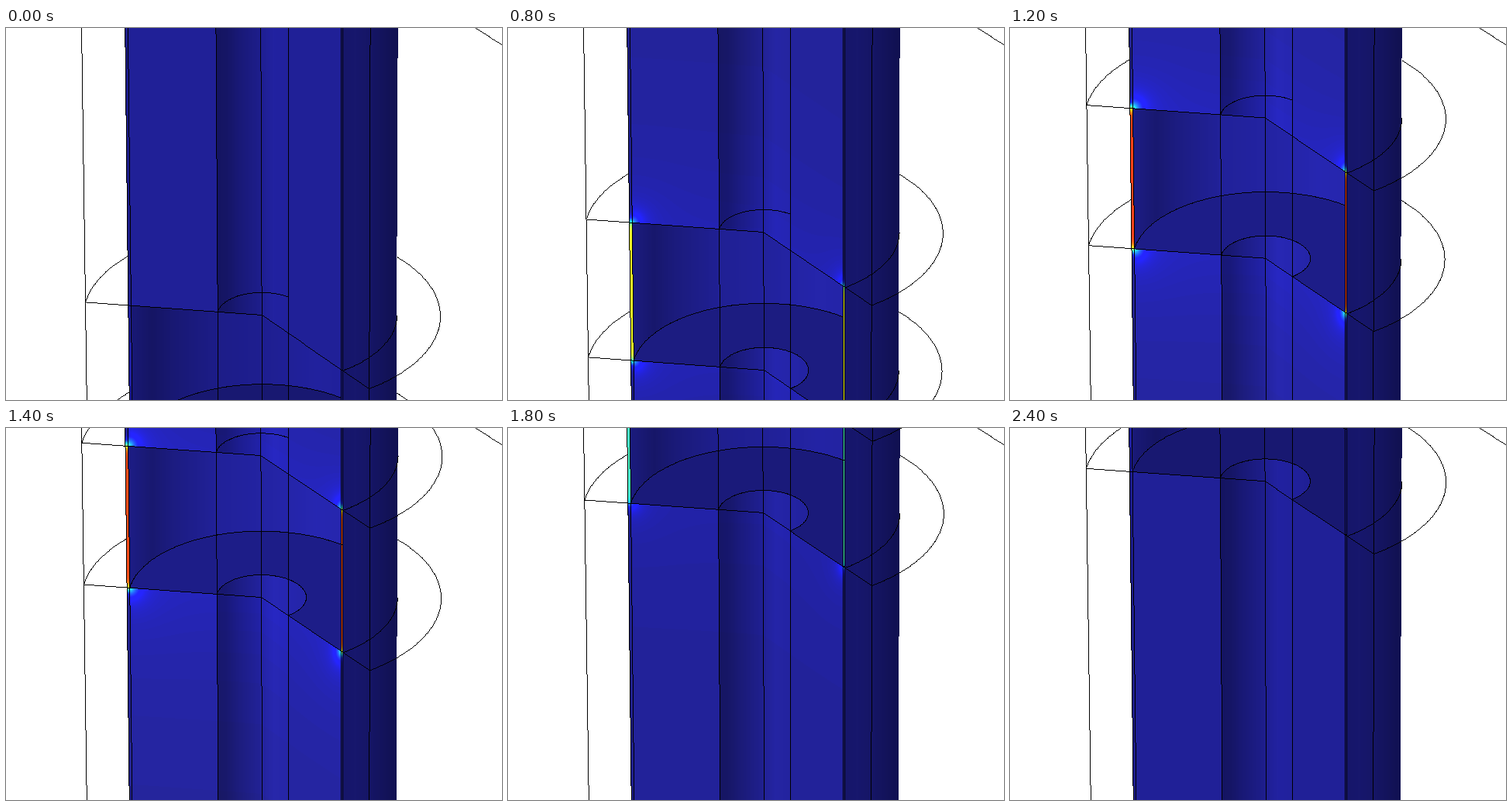
Animation, 640 px wide and 480 px high, one loop 2.5 s. Source, as a matplotlib script:

```python
import numpy as np
import matplotlib.pyplot as plt
from matplotlib.animation import FuncAnimation

W, H, FRAMES, STEP = 640, 480, 25, 4
LEFT, RIGHT = np.radians(188.9), np.radians(413)
HOLE, INNER, OUTER = 0.25, 0.741, 0.757
AMBIENT = np.array([32, 32, 24])
JET = plt.get_cmap("jet")


def spline(vals, start, end):
    """Cubic spline through evenly spaced values with clamped end slopes."""
    v = np.array(vals, float)
    n = len(v)
    A = 4 * np.eye(n) + np.eye(n, k=1) + np.eye(n, k=-1)
    A[0], A[-1] = np.eye(n)[0], np.eye(n)[-1]
    m = np.linalg.solve(A, np.r_[start, 3 * (v[2:] - v[:-2]), end])

    def at(t):
        k = min(int(t), n - 2)
        u = t - k
        h = u * u * (3 - 2 * u)
        return (v[k] * (1 - h) + v[k + 1] * h
                + m[k] * u * (1 - u) ** 2 - m[k + 1] * u * u * (1 - u))
    return at


height = spline([370, 343, 263, 115.5, -32.5, -101, -118], -9, -4)
strength = spline([0.02, 0.36, 0.63, 0.87, 0.70, 0.14, 0.02], 0.2, 0)


# Slightly converging view of a circle lying at height yc
def view(yc):
    return 328.3 + 0.0036 * yc, 234.3 - 0.0105 * yc, 115.3 + 0.0048 * yc


def point(r, ang, yc):
    cx, a, b = view(yc)
    return cx + r * a * np.cos(ang), yc + 1.5 * r * r + r * b * np.sin(ang)


def upright(r, ang):
    return np.transpose([point(r, ang, -200), point(r, ang, 700)])


def edge_x(r, ang, y):
    xs, ys = upright(r, ang)
    return np.interp(y, ys, xs)


def cut(yc):
    pts = [point(1, LEFT, yc), point(0, 0, yc), point(1, RIGHT, yc)]
    return np.transpose(pts)


def inside(r, yc):
    cx, a, b = view(yc)
    return ((X - cx) / (r * a)) ** 2 + ((Y - yc - 1.5 * r * r) / (r * b)) ** 2 < 1


X, Y = np.meshgrid(np.arange(W), np.arange(H))
ROWS = np.arange(H)[:, None]
tube_l, tube_r = edge_x(OUTER, LEFT, ROWS), edge_x(OUTER, 0, ROWS)
wall_l = edge_x(INNER, LEFT, ROWS)
hole_l, hole_r = edge_x(HOLE, LEFT, ROWS), edge_x(HOLE, RIGHT, ROWS)

body = (X >= tube_l - 0.5) & (X <= tube_r - 0.5)
strips = (body & (X < wall_l)) | (X == 433)
shell = X > 433
bore = (X > hole_l) & (X < hole_r)

hole_shade = np.interp(X, [272, 284, 300, 327, 330, 345, 364, 387],
                       [0.64, 0.67, 0.78, 0.92, 0.97, 1.06, 1.03, 0.98])
gap_shade = np.interp(X, [161, 188, 215, 272, 330, 400, 433],
                      [0.78, 0.66, 0.76, 0.90, 0.95, 1.04, 1.02])
shell_shade = np.interp(X, [434, 450, 470, 485, 505],
                        [0.70, 0.72, 0.67, 0.61, 0.53])


def paint(top, floor, s):
    upper, lower = (np.interp(X, *cut(yc)) for yc in (top, floor))
    gap = (Y >= upper) & (Y <= lower)

    shade = np.where(bore, hole_shade, 1.0)
    shade = np.where(gap, gap_shade, shade)
    shade = np.where(gap & inside(INNER, floor), 0.75 + 0.06 * s, shade)
    shade = np.where(gap & inside(HOLE, floor), hole_shade, shade)
    shade = np.where(shell, shell_shade, shade)

    away = np.maximum(np.maximum(upper - Y, Y - lower), 0)
    level = np.where(gap, 0.014, 0.032 * np.exp(-away / 130)) * s
    for yc in (top, floor):
        for ang, squeeze in ((LEFT, 1), (RIGHT, 1.64)):
            px, py = point(INNER, ang, yc)
            d = np.hypot(squeeze * (X - px), Y - py)
            glow = 0.42 * np.exp(-d / 8) + 0.05 * np.exp(-d / 26)
            level = level + np.where(gap, 0, s * glow)
    level = np.where(shell, 0, level)

    band = (np.tanh((Y - upper) / 7 + 0.3) - np.tanh((Y - lower) / 7 - 0.3)) / 2
    level = np.where(strips, s * band, level)
    shade = np.where(strips, 0.92, shade)

    light = AMBIENT + 6 * s * ~shell[..., None]
    rgb = shade[..., None] * (255 * JET(level)[..., :3] + light)
    rgb[~body] = 255
    return np.clip(rgb, 0, 255).astype(np.uint8)


def stroke(rgb, x, y, show=None):
    """Crisp one-pixel polyline; show(x, y) keeps only its visible part."""
    for x0, y0, x1, y1 in zip(x[:-1], y[:-1], x[1:], y[1:]):
        n = int(max(abs(x1 - x0), abs(y1 - y0))) + 2
        px, py = np.linspace(x0, x1, n), np.linspace(y0, y1, n)
        ix, iy = np.rint(px).astype(int), np.rint(py).astype(int)
        keep = (ix >= 0) & (ix < W) & (iy >= 0) & (iy < H)
        if show is not None:
            keep &= show(px, py)
        rgb[iy[keep], ix[keep]] = 0


def outside(x, y):
    return (x < edge_x(OUTER, LEFT, y)) | (x > edge_x(OUTER, 0, y))


def left_of_face(x, y):
    return x < edge_x(HOLE, RIGHT, y)


def in_tube(x, y):
    return x < 433


back = np.linspace(LEFT, 2 * np.pi, 60)
front = np.linspace(2 * np.pi, RIGHT, 20)
sweep = np.r_[back, front]


def draw(rgb, top, floor):
    stroke(rgb, [606, 640], [0, 21.5])
    for r in (HOLE, INNER, OUTER, 1):
        stroke(rgb, *upright(r, LEFT))
    for r in (0, HOLE, 1):
        stroke(rgb, *upright(r, RIGHT))
    for x in (432, 434):
        stroke(rgb, [x, x], [0, H])
    for yc in (top, floor):
        stroke(rgb, *cut(yc))
        stroke(rgb, *point(1, back, yc), outside)
        stroke(rgb, *point(1, front, yc))
        stroke(rgb, *point(OUTER, front, yc))
    stroke(rgb, *point(HOLE, sweep, top), left_of_face)
    stroke(rgb, *point(HOLE, sweep, floor))
    stroke(rgb, *point(INNER, sweep, floor), in_tube)


fig = plt.figure(figsize=(W / 100, H / 100), dpi=100, facecolor="white")
ax = fig.add_axes([0, 0, 1, 1])
image = ax.imshow(np.full((H, W, 3), 255, np.uint8), interpolation="nearest",
                  aspect="auto")
ax.axis("off")


def update(i):
    top = height(i / STEP)
    floor = top + 183.7 - 0.0215 * top
    rgb = paint(top, floor, max(strength(i / STEP), 0))
    draw(rgb, top, floor)
    image.set_data(rgb)
    return [image]


anim = FuncAnimation(fig, update, frames=FRAMES, interval=100, repeat=True,
                     repeat_delay=0, blit=False)
plt.show()
```
